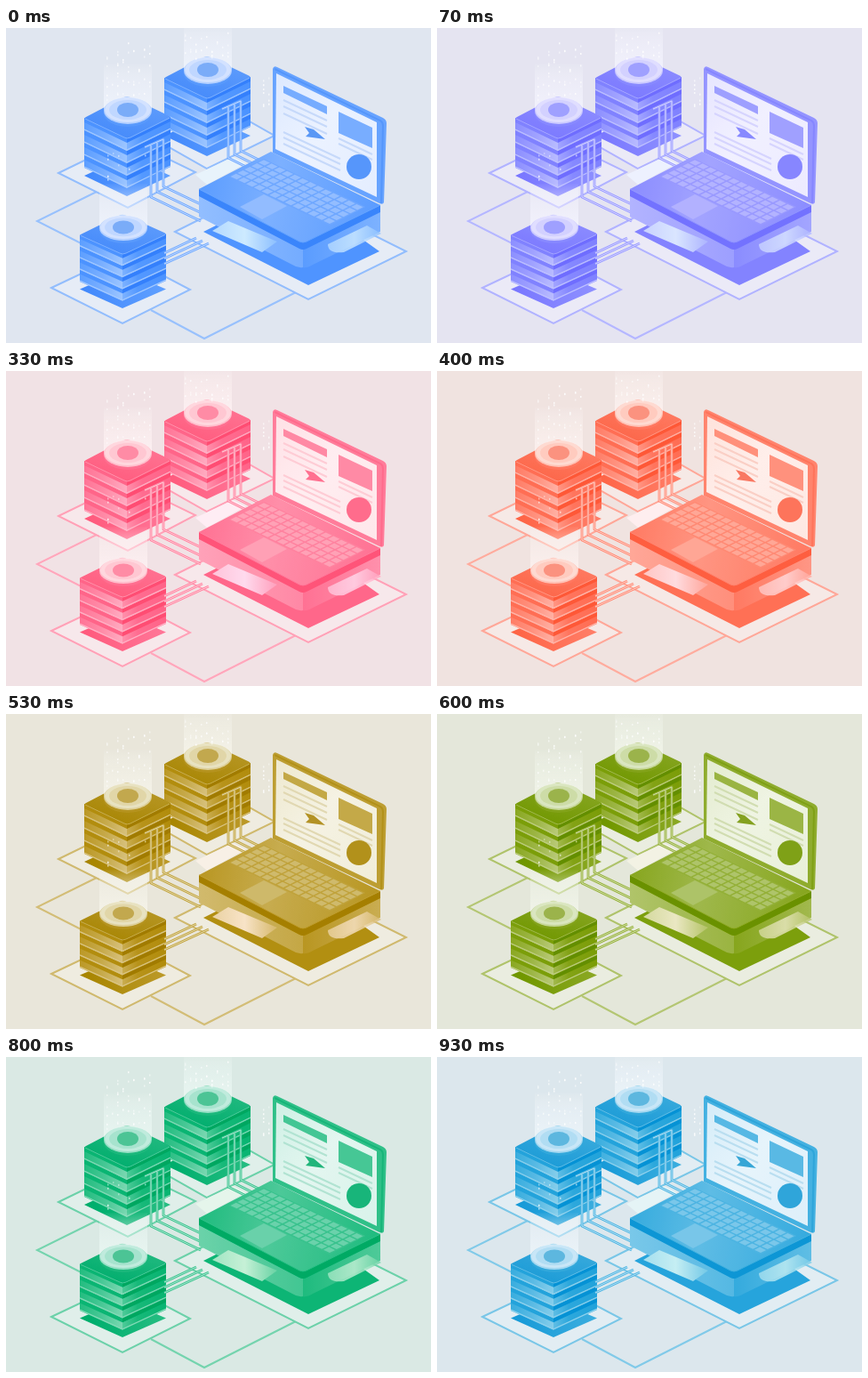
Animation, 478 px wide and 354 px high, one loop 990 ms. Source, as an HTML page:

```html
<!DOCTYPE html>
<html lang="en">
<head>
<meta charset="utf-8">
<title>Isometric servers and laptop</title>
<style>
  html, body { margin: 0; width: 100%; height: 100%; overflow: hidden; background: #e0e6f0; }
  svg { display: block; width: 478px; height: 354px; animation: hue 990ms step-end infinite; }
  @keyframes hue {
    0% { filter: hue-rotate(0deg); }
    7.07% { filter: hue-rotate(24deg); }
    13.13% { filter: hue-rotate(48deg); }
    20.2% { filter: hue-rotate(72deg); }
    27.27% { filter: hue-rotate(96deg); }
    33.33% { filter: hue-rotate(120deg); }
    40.4% { filter: hue-rotate(144deg); }
    47.47% { filter: hue-rotate(168deg); }
    53.53% { filter: hue-rotate(192deg); }
    60.6% { filter: hue-rotate(216deg); }
    67.67% { filter: hue-rotate(240deg); }
    73.73% { filter: hue-rotate(264deg); }
    80.8% { filter: hue-rotate(288deg); }
    87.87% { filter: hue-rotate(312deg); }
    93.93%, 100% { filter: hue-rotate(336deg); }
  }
  .line { fill: none; stroke: #98c1fd; stroke-width: 2; }
  .pad { fill: #e6ecf6; stroke: #92bdfd; stroke-width: 2; }
  .cable { fill: none; stroke: #6fa9ff; stroke-width: 2.8; stroke-linejoin: round; }
  .core { fill: none; stroke: #c3d9ff; stroke-width: 1; stroke-linejoin: round; }
  .text { fill: none; stroke: #c6d9fa; stroke-width: 2; }
</style>
</head>
<body>
<svg viewBox="0 0 478 354">
  <defs>
    <linearGradient id="left">
      <stop offset="0" stop-color="#5c9eff"/><stop offset=".5" stop-color="#78aeff"/><stop offset="1" stop-color="#9cc5ff"/>
    </linearGradient>
    <linearGradient id="right">
      <stop offset="0" stop-color="#7db2ff"/><stop offset=".35" stop-color="#5499ff"/><stop offset="1" stop-color="#4a92ff"/>
    </linearGradient>
    <linearGradient id="side">
      <stop offset="0" stop-color="#5a9cff"/><stop offset="1" stop-color="#7db2ff"/>
    </linearGradient>
    <linearGradient id="lid" x1="0" y1="1" x2=".6" y2="0">
      <stop offset="0" stop-color="#4288fa"/><stop offset="1" stop-color="#5e9cfc"/>
    </linearGradient>
    <linearGradient id="shade" x1="0" x2="1">
      <stop offset="0" stop-color="#4188fc"/><stop offset="1" stop-color="#60a0ff"/>
    </linearGradient>
    <linearGradient id="beam" x1="0" y1="0" x2="0" y2="1">
      <stop offset="0" stop-color="#fff" stop-opacity=".03"/><stop offset=".35" stop-color="#f4f6ff" stop-opacity=".4"/>
      <stop offset="1" stop-color="#f2f7ff" stop-opacity=".75"/>
    </linearGradient>
    <linearGradient id="deck" x1="0" y1=".5" x2="1" y2=".6">
      <stop offset="0" stop-color="#5c9dff"/><stop offset=".4" stop-color="#7cb0ff"/><stop offset="1" stop-color="#5b9cff"/>
    </linearGradient>
    <linearGradient id="front">
      <stop offset="0" stop-color="#92beff"/><stop offset=".5" stop-color="#84b5ff"/><stop offset="1" stop-color="#74acff"/>
    </linearGradient>
    <linearGradient id="glass" x1="0" y1="0" x2="1" y2="1">
      <stop offset="0" stop-color="#dde9ff"/><stop offset=".45" stop-color="#ebf2ff"/><stop offset="1" stop-color="#e4edff"/>
    </linearGradient>
    <linearGradient id="glow">
      <stop offset="0" stop-color="#b4d9ff"/><stop offset=".5" stop-color="#cdeaff"/><stop offset="1" stop-color="#8cbfff"/>
    </linearGradient>

    <g id="slab">
      <path d="M-48-23 0 0V14L-48-9Z" fill="url(#left)"/>
      <path d="M49-24 0 0V14L49-10Z" fill="url(#right)"/>
      <path d="M-48-23Q-24-12 0 0V5L-48-18Z" fill="#4c93ff"/>
      <path d="M49-24 0 0V5L49-19Z" fill="#3480fc"/>
      <path d="M-48-10 0 13 49-11" fill="none" stroke="#a3c9ff" stroke-width="1.300"/>
    </g>
    <g id="tower">
      <path d="M-48 42 0 20 49 42 0 65Z" fill="url(#shade)"/>
      <use href="#slab" y="42"/><use href="#slab" y="28"/><use href="#slab" y="14"/><use href="#slab"/>
      <path d="M-46-24Q-49-22.500-46-21L-4-1Q0 1 4-1L47-22Q50-24 47-25.500L4-46Q0-48-4-46Z" fill="url(#lid)"/>
      <path d="M-47-22-3-1Q0 1 4-1L48-23" fill="none" stroke="#7fb2ff"/>
      <ellipse cx="1" cy="-28" rx="27" ry="15" fill="#5899fc"/>
      <ellipse cx="1" cy="-31" rx="27" ry="15" fill="#b4d0ff"/>
      <ellipse cx="1" cy="-32" rx="26" ry="14" fill="#d3e2ff"/>
      <ellipse cx="1" cy="-32" rx="21" ry="11" fill="#c0d7ff"/>
      <ellipse cx="1" cy="-32" rx="12" ry="8" fill="#7aacf8"/>
      <path d="M-26-84H28V-31A27 15 0 0 0 17-43 28 15 0 0 0-15-43 27 15 0 0 0-26-31Z" fill="url(#beam)"/>
    </g>
  </defs>

  <rect width="478" height="354" fill="#e0e6f0"/>

  <path class="line" d="M110 180 35 217 110 255M163 317 223 349 326 297"/>
  <path class="pad" d="M150 115 226 78 302 121 226 158Z"/>
  <path class="pad" d="M59 163 137 125 213 162 137 202Z"/>
  <path class="pad" d="M51 292 131 254 207 294 131 332Z"/>
  <path class="pad" d="M190 229 298 175 450 251 340 305Z"/>
  <path d="M213 165 255 145 270 152 226 176Z" fill="#e8f3fb"/>

  <use href="#tower" x="226" y="79"/>
  <g id="wires"></g>
  <use href="#tower" x="136" y="124"/>
  <use href="#tower" transform="translate(131 254) scale(1 .94)"/>
  <g id="wires2"></g>

  <path d="M222 229 320 180 420 251 340 289Z" fill="#4f94ff"/>

  <!-- laptop body -->
  <path d="M217 186 334 246V269Q328 270 322 266L217 212Z" fill="url(#front)"/>
  <path d="M421 203 334 246V269Q338 270 345 266L421 229Z" fill="url(#side)"/>
  <path d="M217 181 334 241 421 199V207L338 248Q334 250 330 248L217 189Z" fill="#3a85fb"/>
  <path d="M217 181 298 139 421 199 338 240Q334 242 330 240Z" fill="url(#deck)"/>
  <path d="M217 181 330 240Q334 242 338 240L421 199" fill="none" stroke="#62a2ff"/>
  <path d="M250 167 290 147 404 201 364 222Z" fill="#6ea7ff"/>
  <g id="keys" fill="#93bdff"></g>
  <path d="M263 201 290 187 316 200 288 215Z" fill="#92bcff"/>

  <path d="M232 228 250 217 305 240 288 252Z" fill="url(#glow)"/>
  <path d="M362 243 406 222 422 231 380 252Q362 254 362 243Z" fill="url(#glow)" opacity=".8"/>

  <!-- screen -->
  <path d="M300 140V46Q301 42 305 44L424 101Q428 103 428 107L425 196Q424 199 420 197Z" fill="#67a3ff"/>
  <path d="M302 46 421 104Q424 106 424 110L422 197" fill="none" stroke="#5596fb" stroke-width="2"/>
  <path d="M304 51 417 106V190L303 136Z" fill="url(#glass)"/>
  <path d="M312 65 361 88V97L312 73Z" fill="#76acff"/>
  <path d="M374 94 412 112V135L374 118Z" fill="#78adff"/>
  <path class="text" d="M312 81 361 104M312 88 361 111M312 96 361 119M312 117 376 147M312 123 376 153M312 130 376 160M374 124 412 142M374 130 412 148"/>
  <path d="M336 111 346 114 359 125 337 122 341 118Z" fill="#5a98f5"/>
  <circle cx="397" cy="156" r="14" fill="#5696fb"/>

  <g id="dots" fill="#fff"></g>
</svg>
<script>
  const put = (id, html) => { document.getElementById(id).innerHTML = html; };
  const wire = d => `<path class="cable" d="${d}"/><path class="core" d="${d}"/>`;
  const three = f => [0, 1, 2].map(f).join('');

  put('wires', three(i => wire(`M${243 + 7 * i} ${91 - 3 * i}l7-3V${146 - 4 * i}l40 20`)));
  put('wires2',
    three(i => wire(`M${156 + 7 * i} ${134 - 3 * i}l7-3V${190 - 6 * i}l${56 - 5 * i} ${27 - 2.5 * i}`)) +
    three(i => wire(`M178 ${253 + 6 * i}l${36 + 7 * i} ${-17 - 3 * i}`)));

  // Key grid: columns follow the hinge, rows come toward the viewer.
  let keys = '';
  for (let c = 0; c < 13; c++)
    for (let r = 0; r < 5; r++) {
      const x = 290 + 8.7 * c - 7.8 * r, y = 148.2 + 4.15 * c + 3.9 * r;
      keys += `<path d="M${x} ${y}l7 3.3-6.200 3.100-7-3.300Z"/>`;
    }
  put('keys', keys);

  let seed = 7;
  const rnd = () => (seed = seed * 16807 % 2147483647) / 2147483647;
  const spray = (n, x, y, w, h) => Array.from({ length: n }, () => {
    const px = x + Math.floor(rnd() * w / 6) * 6, py = y + rnd() * h;
    return `<rect x="${px}" y="${py.toFixed(1)}" width="1.500" height="2" opacity="${(.35 + rnd() * .5).toFixed(2)}"/>`;
  }).join('');
  put('dots', spray(48, 113, 16, 54, 64) + spray(28, 201, 4, 54, 30) +
    spray(9, 108, 140, 50, 32) + spray(10, 283, 34, 18, 60));
</script>
</body>
</html>
```
